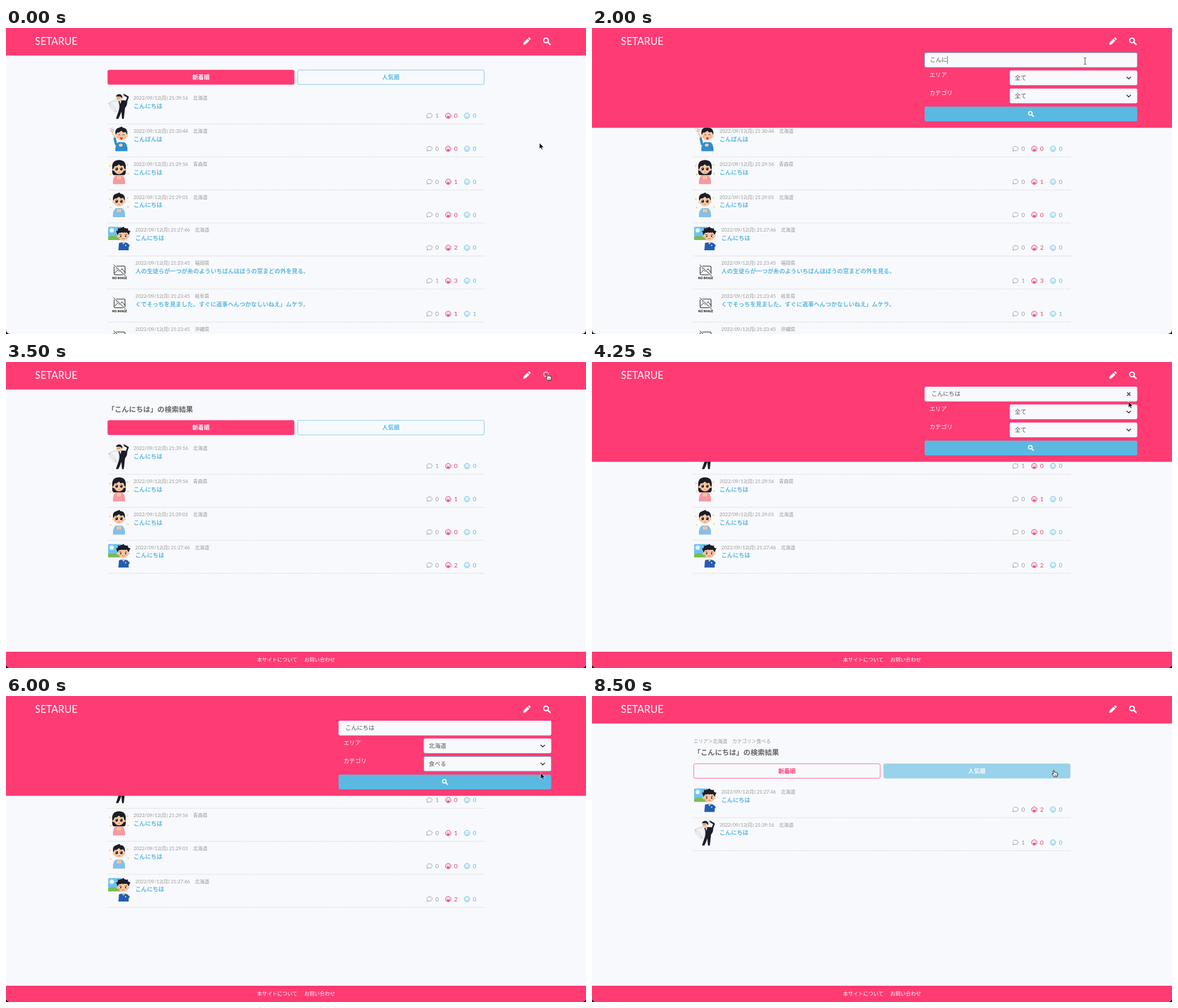
An HTML page for the animation above (8.75 s loop, 960 px wide and 508 px high).

```html
<!DOCTYPE html>
<html lang="ja">
<head>
<meta charset="utf-8">
<title>SETARUE</title>
<style>
html, body { margin: 0; width: 100%; height: 100%; overflow: hidden; background: #000; }
svg { display: block; width: 960px; height: 508px; }
text { font-family: Lato, "Noto Sans CJK JP", "Noto Sans CJK", sans-serif; white-space: pre; }
</style>
</head>
<body>
<svg id="stage" viewBox="0 0 960 508"></svg>
<script>
const PINK = '#ff3b74', BLUE = '#5bb9e1', PAPER = '#f8f9fc', SKIN = '#fbc9a0', INK = '#1c1d28';
const LOOP = 8750, TICK = 250;

// drawing helpers
const path = (d, fill, stroke = 'none', w = 1) =>
  `<path d="${d}" fill="${fill}" stroke="${stroke}" stroke-width="${w}" stroke-linecap="round" stroke-linejoin="round"/>`;
const line = (d, color, w) => path(d, 'none', color, w);
const oval = (x, y, rx, ry, fill) => `<ellipse cx="${x}" cy="${y}" rx="${rx}" ry="${ry}" fill="${fill}"/>`;
const dot = (x, y, r, fill) => oval(x, y, r, r, fill);
const ring = (x, y, r, color, w) => `<circle cx="${x}" cy="${y}" r="${r}" fill="none" stroke="${color}" stroke-width="${w}"/>`;
const box = (x, y, w, h, fill, r = 0, stroke = 'none', sw = 0.8) =>
  `<rect x="${x}" y="${y}" width="${w}" height="${h}" rx="${r}" fill="${fill}" stroke="${stroke}" stroke-width="${sw}"/>`;
const text = (x, y, s, size, fill, weight = 400, anchor = 'start') =>
  `<text x="${x}" y="${y}" font-size="${size}" fill="${fill}" font-weight="${weight}" text-anchor="${anchor}">${s}</text>`;
const at = (x, y, s) => `<g transform="translate(${x} ${y})">${s}</g>`;
const fade = (o, s) => `<g opacity="${o}">${s}</g>`;

// avatars; a head is drawn around its own centre
const sparkles = [[4, 15], [5, 29], [33, 13], [34, 28]].map(([x, y]) =>
  path(`M${x} ${y - 2}l.7 1.3 1.3.7-1.3.7-.7 1.3-.7-1.3-1.3-.7 1.3-.7z`, '#f6d264')).join('');
const cheeks = dot(-6, 4, 1.4, '#f7a08c') + dot(6, 4, 1.4, '#f7a08c');
const head = dot(-9, 2, 1.8, SKIN) + dot(9, 2, 1.8, SKIN) + oval(0, 0, 8.8, 9.2, SKIN) + cheeks +
  path('M-9.5 0C-11-7-9-11-4-12L1-14 2-12C8-12 11-7 9.5 0L7-5 3-4 0-7-4-4-7-4Z', INK);
const plead = [-3.8, 3.8].map(x => oval(x, 0.5, 2.2, 2.6, INK) + dot(x - 0.6, -0.5, 0.8, '#fff')).join('') +
  line('M-1.2 6q1.2-1.3 2.4 0', '#a0473a', 0.7);
const torso = (x, color) =>
  path(`M${x - 10} 45Q${x - 11} 34 ${x - 5} 30H${x + 5}Q${x + 11} 34 ${x + 10} 45Z`, color);
const hands = oval(17.4, 34, 2, 2.8, SKIN) + oval(20.6, 34, 2, 2.8, SKIN) + line('M19 32v4', '#d99a72', 0.5);

const avatars = {
  golf: path('M2 20Q8 15 18 17Q21 27 16 34Q12 36 9 33Q3 28 2 20Z', '#f1f3f5', '#c3c7cb', 0.5) +
    line('M2 20L14 34M3 20Q11 22 15 34M2 20L20 12L30 8', '#b9bdc2', 0.6) +
    path('M18 17Q24 14 32 16Q34 22 29 28Q28 37 27 46H24L23 34Q21 40 18 46H14L19 31Q21 24 18 17Z', INK) +
    line('M31 18L34 10L27 6', INK, 2.6) + dot(19, 11.5, 4.8, SKIN) +
    path('M14 9Q15 5 20 5Q25 6 24.5 12L21 9Z', INK) + dot(26, 7, 1.7, SKIN) +
    path('M20 16l3 .5-2 5z', '#fff') + line('M16.500 11.5h.6M19 11.5h.6', INK, 0.8),
  cheer: path('M3 8Q7 4 11 8L8 16Q4 13 3 8Z', '#fff', '#b9bdc2', 0.5) + line('M6 8l4 2M5.5 11l3.5 2', '#e25555', 1) +
    line('M8 15L13 24', SKIN, 2) + line('M12 24L14 33', '#2e8fd0', 4) + torso(23, '#2e8fd0') +
    at(23, 18, head + line('M-5 0q1.5-2 3 0M2 0q1.5-2 3 0', INK, 0.8) + path('M-2.5 4h5q-.5 4-2.500 4t-2.5-4z', '#d8423c')) +
    oval(22, 35, 3.2, 2.5, SKIN) + line('M32 42L25 36', '#2378b3', 0.8),
  girl: sparkles + path('M8 20Q6 5 19 5Q32 5 30 20Q31 28 28 30H10Q7 28 8 20Z', INK) + torso(19, '#f49aa2') +
    at(19, 19, head + plead) + hands,
  boy: sparkles + torso(19, '#85bfe9') + at(19, 18, head + plead) + hands,
  trip: box(1, 6, 23, 22, '#6cc3ee', 2) + path('M1 23Q10 19 24 24V28H1Z', '#78bd4e') +
    Array.from({ length: 8 }, (_, i) => `<path d="M7 12h4.4" stroke="#fff" transform="rotate(${i * 45} 7 12)"/>`).join('') +
    dot(7, 12, 2.8, '#fff') + path('M18 45L19 33Q26 30 33 33L37 37 35 40V45Z', '#245eaf') +
    at(26, 20, head + path('M-10-2L-12-7-8-7-9-12-3-10 0-14 3-10 8-12 7-8 12-7 9-1 5-6 0-4-6-6Z', INK) +
      line('M-6-1l3 .6M3-.4l3-.6', INK, 0.8) + dot(-4, 2, 1.1, INK) + dot(4, 2, 1.1, INK) + line('M-2 6q2-1.4 4 0', '#a0473a', 0.7)) +
    path('M24 32h5l-2.5 3.5z', SKIN) + dot(30, 37, 1, '#fff'),
  none: box(11, 16.5, 18, 14.5, 'none', 1.6, '#222', 1.1) + line('M12 28l5-5 3 3 4-5 5 6', '#222', 1) + dot(15.5, 20.5, 1.2, '#222') +
    line('M10.5 14.5L30 33', PAPER, 3) + line('M10.5 14.5L30 33', '#222', 1) +
    text(20, 38.5, 'NO IMAGE', 4.8, '#222', 900, 'middle')
};

// small icons
const loupe = (x, y, r, color) => ring(x, y, r, color, r * 0.52) +
  line(`M${x + r * 0.85} ${y + r * 0.85}L${x + r * 1.75} ${y + r * 1.75}`, color, r * 0.62);
const pencil = path('M856 28L856.7 24.2L863.1 17.8L866.2 20.9L859.8 27.3Z', '#fff') +
  path('M864 16.9L865.2 15.8Q866 15.2 866.8 15.9L868 17.2Q868.7 18 868 18.8L867 19.9Z', '#fff');
const bubble = line('M697.7 148.3C695 145 697 141.8 701 141.8C707 142 706.5 149 701 149Q699.5 149 698.7 148.6Q698 149.6 696.4 149.7Q697.4 149 697.7 148.3Z', '#999', 0.9);
const eyes = (x, color) => dot(x - 1.6, 144.6, 0.7, color) + dot(x + 1.6, 144.6, 0.7, color);
const laugh = ring(732, 145.7, 4.4, '#e8356c', 1) + eyes(732, '#e8356c') + path('M729.2 146.6h5.6q-.5 2.6-2.8 2.6t-2.8-2.6z', '#e8356c');
const smile = ring(763, 145.7, 4.4, BLUE, 1) + eyes(763, BLUE) + line('M760.8 147.2q2.2 2.2 4.4 0', BLUE, 0.9);

// content
const posts = [
  ['golf', '21:39:16', '北海道', 'こんにちは', [1, 0, 0]],
  ['cheer', '21:30:44', '北海道', 'こんばんは', [0, 0, 0]],
  ['girl', '21:29:56', '青森県', 'こんにちは', [0, 1, 0]],
  ['boy', '21:29:01', '北海道', 'こんにちは', [0, 0, 0]],
  ['trip', '21:27:46', '北海道', 'こんにちは', [0, 2, 0]],
  ['none', '21:23:45', '福岡県', '人の生徒らが一つが糸のよういちばんはぼうの窓まどの外を見る。', [1, 3, 0]],
  ['none', '21:23:45', '岐阜県', 'くでそっちを見ました。すぐに返事へんつかなしいねえ」ムケラ。', [0, 1, 1]],
  ['none', '21:23:45', '沖縄県', '', [0, 0, 0]]
];
const pages = {
  home: { shift: 0, rows: [0, 1, 2, 3, 4, 5, 6, 7] },
  word: { shift: 27.1, rows: [0, 2, 3, 4] },
  found: { shift: 42.7, rows: [0, 4], crumbs: true },
  popular: { shift: 42.7, rows: [4, 0], crumbs: true, popular: true }
};
const areas = ('全て 北海道 青森県 岩手県 宮城県 秋田県 山形県 福島県 茨城県 栃木県 群馬県 埼玉県 千葉県 東京都 ' +
  '神奈川県 新潟県 富山県 石川県 福井県 山梨県 長野県 岐阜県 静岡県 愛知県 三重県 滋賀県 京都府').split(' ');
const kinds = '全て 食べる 遊ぶ 買う その他'.split(' ');

function row(id, top) {
  const [pic, time, area, title, counts] = posts[id];
  const x = id < 4 ? 211 : 214;
  const nums = counts.map((n, i) => text([713.5, 744.5, 775.5][i], 149.3, n, 9.8, ['#999', '#e8356c', BLUE][i], 400, 'middle')).join('');
  return at(168, top, avatars[pic]) +
    text(x, top + 14.4, `2022/09/12(月) ${time}　${area}`, 8, '#999') +
    text(x, top + 28.2, title, 9.6, BLUE, 700) +
    at(0, top - 104.7, bubble + laugh + smile + nums) +
    `<path d="M168 ${top + 54.6}H792" stroke="#cfd2d5" stroke-width=".9" stroke-dasharray="2 1.4"/>`;
}

function tab(x, y, label, color, on, hover) {
  return fade(hover ? 0.6 : 1, box(x + 0.4, y, 308.6, 24, on ? color : 'none', 2.5, color, 0.7) +
    text(x + 154.6, y + 15, label, 9.6, on ? '#fff' : color, 700, 'middle'));
}

function body(s) {
  const p = pages[s.page], y = 69.8 + p.shift;
  let out = p.crumbs ? text(168, 78.3, 'エリア＞北海道　カテゴリ＞食べる', 8, '#999') : '';
  if (p.shift) out += text(168, y - 14.4, '「こんにちは」の検索結果', 11.8, '#666', 700);
  out += tab(168, y, '新着順', PINK, !p.popular) + tab(482.4, y, '人気順', BLUE, p.popular, s.hover === 'tab');
  out += p.rows.map((id, i) => row(id, 104.7 + p.shift + i * 54.8)).join('');
  if (p.shift) out += box(0, 481, 960, 27, PINK) +
    text(415.5, 497, '本サイトについて', 8.4, '#fff') + text(493.8, 497, 'お問い合わせ', 8.5, '#fff');
  return out;
}

function field(x, y, w, focus) {
  return (focus ? box(x - 1.2, y - 1.2, w + 2.4, 26.8, '#b0609c', 3.2) : '') +
    box(x, y, w, 24.4, PAPER, 2.4, focus ? '#8098cc' : 'none', 0.9);
}
const select = (y, label, focus) => field(691.5, y, 211, focus) +
  text(699.8, y + 15.4, label, 9.6, '#555') + line(`M885.2 ${y + 10.8}l3.2 3.2 3.2-3.2`, '#333', 1.4);

function header(s) {
  let out = box(0, 0, 960, s.open ? 165.7 : 45.7, PINK) + text(48, 28, 'SETARUE', 16.5, '#fff') + pencil +
    fade(s.hover === 'icon' ? 0.6 : 1, loupe(893.8, 20.6, 3.9, '#fff'));
  if (!s.open) return out;
  out += field(550.5, 41, 352, s.focus === 'word') +
    text(s.page === 'home' ? 559.3 : 561.8, 55.5, s.word || 'キーワード', 9.6, s.word ? '#555' : '#6c757d');
  if (s.focus === 'word') out += line(`M${559.5 + 9.6 * s.word.length} 47v12`, '#333', 0.7);
  if (s.clear) out += line('M886.2 51l4.4 4.4m0-4.4l-4.4 4.4', '#27306f', 1.5);
  return out + text(558.5, 80.7, 'エリア', 9.6, '#fff') + text(558.5, 110.7, 'カテゴリ', 9.6, '#fff') +
    select(70.6, s.area, s.focus === 'area') + select(100.5, s.kind, s.focus === 'kind') +
    fade(s.hover === 'button' ? 0.6 : 1, box(550.5, 130.5, 352, 24.5, BLUE, 2.4) + loupe(725.5, 141.6, 3, '#fff'));
}

function menu({ kind, pick, alpha }) {
  const list = kind ? kinds : areas, y = kind ? 112.5 : 82.5, step = 15.37;
  let out = box(685, y - 10.5, 213, kind ? list.length * step + 6 : 433, '#f1f1f4', 4, '#cfcfd4', 0.6);
  if (pick !== undefined) out += box(688, y + pick * step - 7.6, 207, 15.2, '#3c82f0', 3);
  out += list.map((name, i) => text(702, y + i * step + 3.2, name, 8.7, i === pick ? '#fff' : '#333')).join('');
  out += line(`M692 ${y}l1.8 2 3-4.5`, '#333', 1);
  if (!kind) out += line('M788 493.5l3.5 3 3.5-3', '#333', 1);
  return fade(alpha, out);
}

const cursors = {
  arrow: path('M0 0V9.6L2.2 7.6L3.7 11L5.3 10.3L3.9 7H6.9Z', '#000', '#fff', 0.6),
  hand: path('M-2.6 .8V-4.5Q-1.7-6-.7-4.5V-1.5Q.8-2.5 1.3-1.2Q2.7-2 3.2-.7Q4.7-1 4.7.5V2.5Q4.5 4 3.7 5.5H-1.5Q-2.5 3.8-4.3 1.7Q-4.6 0-2.6.8Z', '#fff', '#111', 0.9) +
    line('M-.2 2v2M1.3 2v2M2.8 2v2', '#111', 0.5),
  beam: line('M-1.5-5.5Q0-5.5 0-4.5V4.5Q0 5.5-1.5 5.5M1.5-5.5Q0-5.5 0-4.5M0 4.5Q0 5.5 1.5 5.5', '#222', 0.8)
};

// time, cursor, position, what changes
const steps = [
  [0, 'arrow', 883, 191, { page: 'home', open: 0, word: '', area: '全て', kind: '全て', focus: '', hover: '', clear: 0, menu: null }],
  [250, 'arrow', 885, 168],
  [500, 'arrow', 895, 80],
  [750, 'hand', 905, 26, { hover: 'icon' }],
  [1000, 'hand', 905, 26, { open: 1 }],
  [1250, 'beam', 868, 46, { hover: '' }],
  [1500, 'beam', 820, 54, { focus: 'word' }],
  [1750, 'beam', 816, 55, { word: 'こ' }],
  [2000, 'beam', 816, 55, { word: 'こんに' }],
  [2250, 'beam', 816, 55, { word: 'こんにちは', clear: 1 }],
  [2500, 'arrow', 816, 98],
  [2750, 'hand', 816, 141, { hover: 'button' }],
  [3000, 'arrow', 815, 136, { page: 'word', open: 0, focus: '', hover: '' }],
  [3250, 'arrow', 850, 86],
  [3500, 'hand', 898, 25, { hover: 'icon' }],
  [3750, 'hand', 898, 25, { open: 1, clear: 0 }],
  [4000, 'arrow', 892, 46, { hover: '', clear: 1 }],
  [4250, 'arrow', 888, 66],
  [4500, 'arrow', 887, 80, { focus: 'area', clear: 0, menu: { pick: 0, alpha: 0.97 } }],
  [4750, 'arrow', 885.5, 95.5, { menu: { pick: 1, alpha: 0.97 } }],
  [5000, 'arrow', 885.5, 95.5, { menu: { alpha: 0.07 } }],
  [5250, 'arrow', 886, 108, { area: '北海道', menu: null }],
  [5500, 'arrow', 886, 112, { focus: 'kind', menu: { kind: 1, pick: 0, alpha: 0.97 } }],
  [5750, 'arrow', 885, 126, { menu: { kind: 1, pick: 1, alpha: 0.97 } }],
  [6000, 'arrow', 885, 128, { kind: '食べる', menu: null }],
  [6250, 'hand', 887, 143, { hover: 'button' }],
  [6500, 'hand', 887, 143, { page: 'found', open: 0, focus: '', hover: '' }],
  [6750, 'arrow', 884.5, 139],
  [7250, 'arrow', 862, 138],
  [7500, 'arrow', 806, 132],
  [7750, 'hand', 766, 128.5, { hover: 'tab' }],
  [8250, 'hand', 766, 128.5, { page: 'popular' }]
];

function render(ms) {
  const s = {};
  for (const [t, cursor, x, y, change] of steps) if (t <= ms) Object.assign(s, { cursor, x, y }, change);
  document.getElementById('stage').innerHTML =
    '<clipPath id="win"><path d="M0 0H960V500Q960 508 952 508H8Q0 508 0 500Z"/></clipPath><g clip-path="url(#win)">' +
    box(0, 0, 960, 508, PAPER) + body(s) + header(s) + (s.menu ? menu(s.menu) : '') + '</g>' +
    at(s.x, s.y, cursors[s.cursor]);
}

const start = performance.now();
let shown = -1;
function play() {
  const ms = Math.floor((performance.now() - start) % LOOP / TICK) * TICK;
  if (ms !== shown) render(shown = ms);
  requestAnimationFrame(play);
}
play();
</script>
</body>
</html>
```
